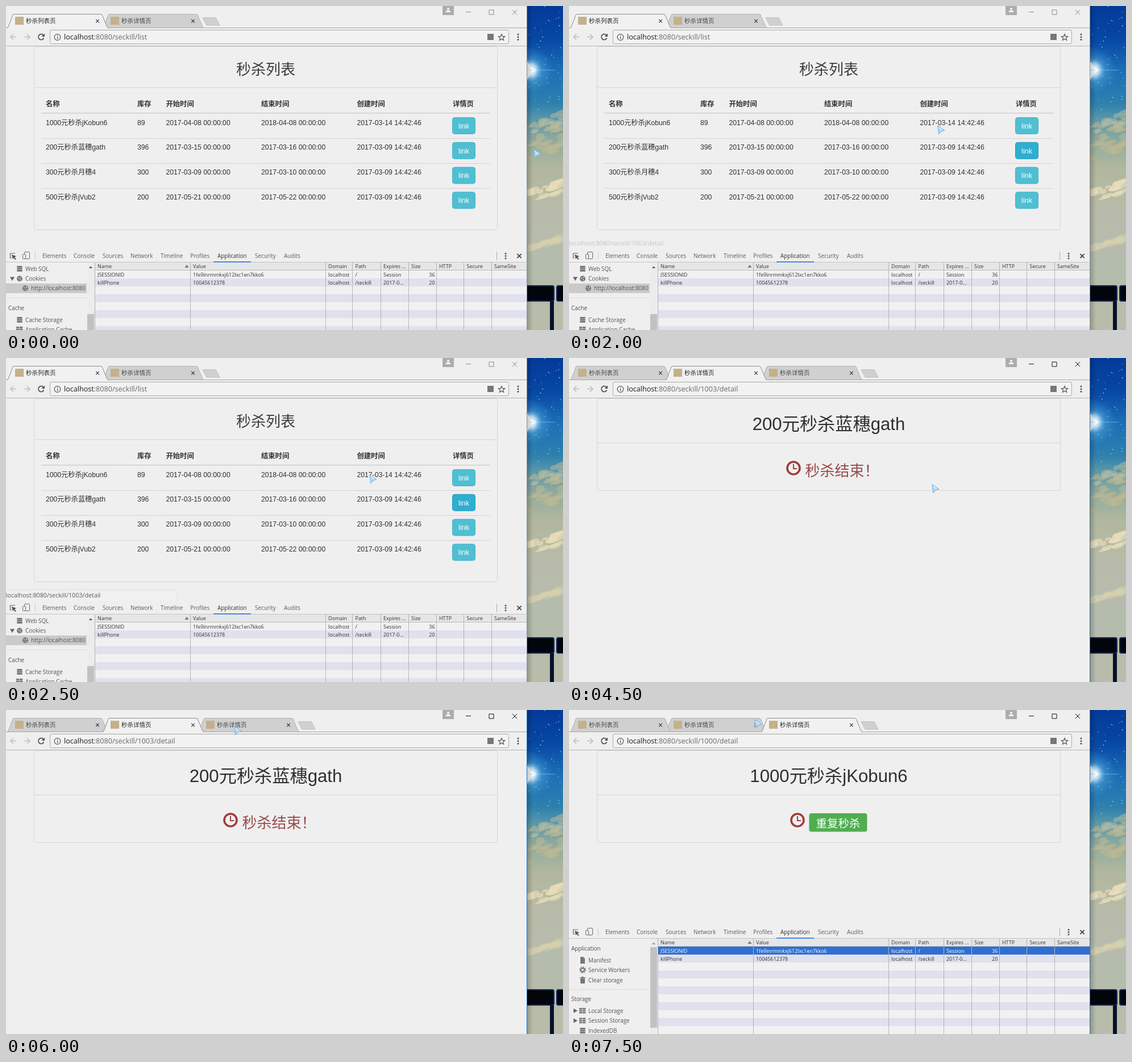
An HTML page with a canvas for the animation above (8000 ms loop, 980x571 px).

```html
<!DOCTYPE html>
<html lang="zh-CN">
<head>
<meta charset="utf-8">
<style>
html, body { margin: 0; width: 100%; height: 100%; overflow: hidden; background: #efefef; }
canvas { display: block; }
</style>
</head>
<body>
<canvas id="stage" width="980" height="571"></canvas>
<script>
const ctx = document.getElementById('stage').getContext('2d');
const UI = '"Open Sans", "Noto Sans CJK SC", "Noto Sans CJK", sans-serif';
const PAGE = '"Liberation Sans", "Noto Sans CJK SC", "Noto Sans CJK", sans-serif';
const BG = '#efefef', INK = '#505050';
const LOOP = 8000;

// [start, view, pointer x, pointer y]
const STEPS = [
  [0, 'list', 929, 253],
  [500, 'hover', 801, 250],
  [2000, 'fade', 649, 211],
  [2500, 'status', 640, 206],
  [3000, 'loading', 641, 205],
  [4500, 'ended', 639, 223],
  [5000, 'ended', 428, 111],
  [6000, 'ended', 402, 29],
  [6500, 'tabHover', 490, 20],
  [7000, 'tabHover', 245, 20],
  [7500, 'repeat', 327, 17]
];
const GOODS = [
  ['1000元秒杀jKobun6', '89', '2017-04-08', '2018-04-08', '2017-03-14'],
  ['200元秒杀蓝穗gath', '396', '2017-03-15', '2017-03-16', '2017-03-09'],
  ['300元秒杀月穗4', '300', '2017-03-09', '2017-03-10', '2017-03-09'],
  ['500元秒杀jVub2', '200', '2017-05-21', '2017-05-22', '2017-03-09']
];

// Drawing helpers; text is centred vertically on y.
function text(str, x, y, size, color = INK, { font = UI, weight = 400, align = 'left' } = {}) {
  ctx.font = `${weight} ${size}px ${font}`;
  ctx.textAlign = align;
  ctx.fillStyle = color;
  ctx.fillText(str, x, Math.round(y + size * 0.37));
}
function rect(x, y, w, h, color) {
  ctx.fillStyle = color;
  ctx.fillRect(x, y, w, h);
}
function paint(fill, stroke, width = 1) {
  if (fill) { ctx.fillStyle = fill; ctx.fill(); }
  if (stroke) { ctx.strokeStyle = stroke; ctx.lineWidth = width; ctx.stroke(); }
}
function box(x, y, w, h, radius, fill, stroke, width) {
  ctx.beginPath();
  ctx.roundRect(x, y, w, h, radius);
  paint(fill, stroke, width);
}
function path(points, fill, stroke, width, open) {
  ctx.beginPath();
  for (let i = 0; i < points.length; i += 2) ctx.lineTo(points[i], points[i + 1]);
  if (!open) ctx.closePath();
  paint(fill, stroke, width);
}
const line = (points, color, width = 1) => path(points, null, color, width, true);
function circle(x, y, r, fill, stroke, width) {
  ctx.beginPath();
  ctx.arc(x, y, r, 0, 7);
  paint(fill, stroke, width);
}
function cross(x, y, r, color, width = 1) {
  line([x - r, y - r, x + r, y + r], color, width);
  line([x + r, y - r, x - r, y + r], color, width);
}
function dots(x, y, gap, color) {
  for (const d of [-gap, 0, gap]) circle(x, y + d, 1.5, color);
}
function gradient(g, ...stops) {
  stops.forEach(([at, color]) => g.addColorStop(at, color));
  return g;
}

function wallpaper() {
  let seed = 7;
  const random = () => (seed = seed * 16807 % 2147483647) / 2147483647;
  // Puffs strewn along a slanted band.
  const cloud = (left, right, spread, color) => {
    for (let i = 0; i < 22; i++) {
      const u = random();
      ctx.beginPath();
      ctx.ellipse(917 + u * 63, left + (right - left) * u + (random() - 0.5) * spread,
        5 + random() * 8, 2 + random() * 4, -0.3, 0, 7);
      paint(color);
    }
  };
  ctx.save();
  ctx.beginPath();
  ctx.rect(916, 0, 64, 571);
  ctx.clip();
  rect(916, 0, 64, 571, gradient(ctx.createLinearGradient(0, 0, 0, 571),
    [0, '#043a98'], [0.1, '#0647a4'], [0.2, '#1b6fb6'], [0.3, '#2d80ad'], [0.35, '#5c98a9'],
    [0.42, '#93ab9e'], [0.5, '#b0b79d'], [0.62, '#b9bba9'], [0.8, '#b4bcae'], [1, '#b9bca9']));
  for (let i = 0; i < 60; i++) circle(917 + random() * 63, random() * 185, 0.3 + random() * 0.8, '#7fbce4');
  circle(922, 113, 42, gradient(ctx.createRadialGradient(922, 113, 3, 922, 113, 42),
    [0, '#ffffff'], [0.2, '#d8f2ffcc'], [0.45, '#63b5e666'], [1, '#3b94d800']));
  path([917, 98, 923, 107, 934, 113, 923, 119, 917, 130], '#f2fbff');
  rect(917, 112.5, 50, 1, '#9fd4f488');
  cloud(222, 196, 20, '#b4b99f88');
  cloud(265, 225, 50, '#bdb99388');
  cloud(338, 316, 22, '#e8dcb8aa');
  cloud(428, 408, 10, '#d9d3b066');
  const beam = '#0b2b5c';
  box(912, 493, 52, 27, 3, '#03050d', beam, 2);
  box(969, 493, 20, 27, 3, '#03050d', beam, 2);
  rect(957, 520, 7, 51, '#08122c');
  rect(917, 0, 10, 571, gradient(ctx.createLinearGradient(917, 0, 927, 0), [0, '#0003'], [1, '#0000']));
  ctx.restore();
}

function tab({ x, width, title, active, hot }) {
  const end = x + width;
  path([x, 38.5, x + 2, 37, x + 10, 15.5, x + 12, 14.5, end - 3, 14.5, end - 1, 15.5, end + 8, 37, end + 10, 38.5],
    active ? '#f1f1f1' : hot ? '#dedede' : '#d0d0d0', active ? '#8c8c8c' : '#b0b0b0', 1);
  if (active) rect(x + 1, 38, width + 8, 1.5, '#f1f1f1');
  if (title) {
    rect(x + 14, 19, 15, 14, '#c4b08a');
    text(title, x + 33, 26, 10.5, active ? '#222' : '#444');
  }
  cross(end - 9, 26.5, 2.8, '#333', 1.1);
}

function browser(view) {
  const listing = ['list', 'hover', 'fade', 'status'].includes(view);
  const loading = view === 'loading';
  const titles = listing ? ['秒杀列表页', '秒杀详情页']
    : ['秒杀列表页', loading ? '' : '秒杀详情页', '秒杀详情页'];
  const current = listing ? 0 : view === 'repeat' ? 2 : 1;
  rect(0, 0, 916, 571, BG);
  rect(916, 0, 1, 571, listing ? '#8797a5' : '#1b7ac8');

  // The untitled tab is still growing into its 52px slot.
  let x = 2;
  const tabs = titles.map((title, i) => {
    const entry = { x, width: title ? 168 : 43, title, active: i === current, hot: view === 'tabHover' && i === 2 };
    x += title ? 168 : 52;
    return entry;
  });
  tabs.filter(t => !t.active).reverse().forEach(tab);
  path([x + 8, 20.5, x + 31, 20.5, x + 38, 34, x + 15, 34], '#d0d0d0', '#bdbdbd');
  line([0, 38.5, 916, 38.5], '#a8a8a8');
  tab(tabs[current]);

  const control = listing ? '#8a8a8a' : '#111';
  rect(768, 0, 20, 16, '#acacac');
  circle(778, 5, 2, '#fff');
  box(774, 8, 8, 3, 1, '#fff');
  line([809, 10.5, 818, 10.5], control);
  box(850, 7, 8, 8, 0, null, control);
  cross(895, 11, 4.2, control);

  line([18, 54.5, 8, 54.5], '#bcbcbc', 1.5);
  line([13, 49.5, 8, 54.5, 13, 59.5], '#bcbcbc', 1.5);
  line([32, 54.5, 42, 54.5], '#bcbcbc', 1.5);
  line([37, 49.5, 42, 54.5, 37, 59.5], '#bcbcbc', 1.5);
  if (loading) cross(62, 54.5, 5, '#505050', 1.8);
  else {
    ctx.beginPath();
    ctx.arc(62, 54.5, 5, 0.4, 5.5);
    paint(null, '#505050', 1.7);
    path([68, 48.5, 68, 54, 62.5, 54], '#505050');
  }
  box(77.5, 42.5, 807, 24, 2, '#f2f2f2', '#aaa');
  circle(90.5, 55, 5.4, null, '#555', 1.2);
  rect(90, 54, 1.3, 4, '#555');
  rect(90, 51.7, 1.3, 1.3, '#555');
  const host = 'localhost';
  text(host, 102, 54.5, 12.6, '#1c1c1c');
  const hostWidth = ctx.measureText(host).width;
  const page = listing ? 'list' : view === 'repeat' ? '1000/detail' : '1003/detail';
  text(':8080/seckill/' + page, 102 + hostWidth, 54.5, 12.6, '#696969');
  if (!loading) rect(847, 49, 11, 11, '#777');
  const star = [];
  for (let i = 0; i < 10; i++) {
    const a = i * Math.PI / 5 - Math.PI / 2, r = i % 2 ? 2.7 : 6;
    star.push(872 + r * Math.cos(a), 55.5 + r * Math.sin(a));
  }
  path(star, null, '#555', 1.2);
  dots(901, 54.7, 4.6, '#505050');
  line([0, 70.5, 916, 70.5], '#b5b5b5');
}

function card(height, divider) {
  box(49.5, 71.5, 815, height, 3, null, '#d6d6d6');
  line([50, divider, 864, divider], '#d3d3d3');
}

function listPage(hovered) {
  const dark = '#303030', font = PAGE;
  card(323, 144);
  text('秒杀列表', 457, 111.5, 26, '#3c3c3c', { font, weight: 300, align: 'center' });
  const columns = [70, 231, 281.5, 449, 617.5, 786];
  ['名称', '库存', '开始时间', '结束时间', '创建时间', '详情页'].forEach((label, i) =>
    text(label, columns[i], 172, 12.3, dark, { font, weight: 600 }));
  line([62, 188.7, 852, 188.7], '#cfcfcf', 1.6);
  GOODS.forEach((row, r) => {
    const y = 205 + r * 43.8;
    row.forEach((cell, c) => {
      const time = c < 2 ? '' : c === 4 ? ' 14:42:46' : ' 00:00:00';
      text(cell + time, columns[c], y, 12.2, dark, { font, weight: 300 });
    });
    const hot = hovered && r === 1;
    box(785.5, y - 8.5, 40, 29, 4, hot ? '#2eaed1' : '#50bfd2', hot ? '#2799b9' : '#43b3ca');
    text('link', 805.5, y + 6.2, 12.5, '#fff', { font, align: 'center' });
    if (r < 3) line([62, Math.round(y + 28) + 0.5, 852, Math.round(y + 28) + 0.5], '#d3d3d3');
  });
}

function statusBubble(faint) {
  if (!faint) box(-3.5, 408.5, 305, 24, 3, '#f0f0f0', '#dedede');
  text('localhost:8080/seckill/1003/detail', -0.5, 418.5, 10.75, faint ? '#c4c4c4' : '#5c5c5c');
}

function clock(x) {
  const red = '#a03c3c';
  circle(x, 194, 11, null, red, 3.6);
  line([x, 187, x, 195, x + 6, 195], red, 2);
}

function detailPage(repeat) {
  const font = PAGE;
  card(162, 149.5);
  text(GOODS[repeat ? 0 : 1][0], 457, 115, 31.2, '#303030', { font, weight: 300, align: 'center' });
  clock(repeat ? 402 : 395);
  if (repeat) {
    box(422.5, 182, 102, 32.5, 4, '#4fae50');
    text('重复秒杀', 473.5, 200, 19.5, '#fff', { font, weight: 500, align: 'center' });
  } else text('秒杀结束！', 415.5, 198, 26, '#974a4c', { font, weight: 300 });
}

const ICONS = {
  database(x, y) {
    for (const d of [-3.5, 0, 3.5]) box(x - 5, y + d - 1.5, 10, 3, 1.5, '#777');
  },
  grid(x, y) {
    for (let i = 0; i < 6; i++) rect(x - 6 + i % 2 * 6, y - 5 + (i >> 1) * 3.5, 5.3, 2.7, '#777');
  },
  cookie(x, y) {
    circle(x, y, 5, '#777');
    for (const [dx, dy] of [[-2, -1], [1, 2], [2, -2]]) circle(x + dx, y + dy, 1, BG);
  },
  file(x, y) { path([x - 4, y - 6, x + 1, y - 6, x + 4, y - 3, x + 4, y + 6, x - 4, y + 6], '#777'); },
  gear(x, y) {
    ctx.setLineDash([2, 1.9]);
    circle(x, y, 5, null, '#777', 2);
    ctx.setLineDash([]);
    circle(x, y, 3, null, '#777', 2);
  },
  trash(x, y) {
    rect(x - 5, y - 5, 10, 1.5, '#777');
    rect(x - 2, y - 6, 4, 1, '#777');
    box(x - 4, y - 3, 8, 9, 1, '#777');
  }
};

function item(icon, label, y, x = 24, arrow) {
  ICONS[icon](x, y);
  text(label, x + 10, y, 9.9, '#555');
  if (arrow === 'open') path([7, y - 3, 15, y - 3, 11, y + 4], '#666');
  if (arrow === 'closed') path([8, y - 4, 15, y, 8, y + 4], '#666');
}

function sidebar(repeat) {
  if (repeat) {
    text('Application', 4, 420, 9.9);
    item('file', 'Manifest', 441);
    item('gear', 'Service Workers', 458);
    item('trash', 'Clear storage', 476);
    line([0, 492.5, 142, 492.5], '#dadada');
    text('Storage', 4, 509, 9.9);
    item('grid', 'Local Storage', 530, 24, 'closed');
    item('grid', 'Session Storage', 547.5, 24, 'closed');
    item('database', 'IndexedDB', 565);
  } else {
    item('database', 'Web SQL', 463);
    item('cookie', 'Cookies', 480.5, 24, 'open');
    rect(0, 489, 142, 17, '#cacaca');
    item('cookie', 'http://localhost:8080', 497.5, 34);
    line([0, 514.5, 142, 514.5], '#dadada');
    text('Cache', 4, 532, 9.9);
    item('database', 'Cache Storage', 553);
    item('grid', 'Application Cache', 570);
  }
}

function devtools(repeat) {
  const top = repeat ? 380 : 429;
  const mid = top + 11;
  rect(0, top, 916, 571 - top, BG);
  line([16, mid - 4, 7.5, mid - 4, 7.5, mid + 4, 10, mid + 4], '#666', 1.2);
  path([10, mid - 2, 18, mid + 1, 15, mid + 3, 18, mid + 6, 16, mid + 7, 13.5, mid + 4, 12, mid + 6], '#555');
  box(32.5, mid - 6.5, 9, 12, 1, null, '#666');
  box(29.5, mid - 2.5, 5, 8, 1, BG, '#666');
  line([51.5, mid - 7, 51.5, mid + 7], '#ccc');
  const panels = { Elements: 64, Console: 119, Sources: 170, Network: 219, Timeline: 272, Profiles: 324,
    Application: 372, Security: 438, Audits: 489 };
  for (const name in panels) text(name, panels[name], mid, 9.9, name === 'Application' ? '#333' : '#5c5c5c');
  line([0, top + 22.5, 916, top + 22.5], '#c4c4c4');
  rect(365, top + 21, 66, 2, '#4787ec');
  line([863.5, mid - 7, 863.5, mid + 7], '#aaa');
  dots(879, mid + 0.5, 4.3, '#555');
  cross(903, mid + 0.5, 3.7, '#444', 1.8);

  sidebar(repeat);
  rect(143, top + 23, 13, 571, '#ececec');
  path([146, top + 33, 152, top + 33, 149, top + 29.5], repeat ? '#999' : '#555');
  if (repeat) rect(143, 418, 12, 142, '#c1c1c1');
  else rect(143, 543, 12, 28, '#c1c1c1');

  const columns = [157, 325, 563, 610.5, 660, 709, 758, 806.5, 855];
  const first = top + 37;
  rect(157, top + 23, 759, 14, '#e6e6e6');
  for (let i = 0, y = first; y < 571; i++, y += 14) {
    rect(157, y, 759, 14, repeat && i === 0 ? '#2f6fd2' : i % 2 ? '#e0e0ef' : '#f1f1f1');
  }
  columns.forEach(x => line([Math.floor(x) - 0.5, top + 23, Math.floor(x) - 0.5, 571], '#b4b4b4'));
  line([157, first - 0.5, 916, first - 0.5], '#b8b8b8');
  path([314.5, top + 32, 321.5, top + 32, 318, top + 27], '#777');
  const rows = [
    ['Name', 'Value', 'Domain', 'Path', 'Expires ...', 'Size', 'HTTP', 'Secure', 'SameSite'],
    ['JSESSIONID', '1fe9inrmmkxj612lxc1en7kko6', 'localhost', '/', 'Session', '36'],
    ['killPhone', '10045612378', 'localhost', '/seckill', '2017-0...', '20']
  ];
  rows.forEach((row, r) => row.forEach((cell, c) => {
    const number = r && c === 5;
    text(cell, number ? 754.5 : columns[c] + 4, top + 30 + r * 14.2, 8.95,
      repeat && r === 1 ? '#fff' : '#333', { align: number ? 'right' : 'left' });
  }));
}

function pointer(x, y) {
  ctx.save();
  ctx.translate(x, y);
  path([0, 0, 11.5, 8, 6, 10, 1.5, 14.5], '#b4d9f5', '#7dbbe6', 1.2);
  line([2, 3, 8, 7.5], '#f4fbff', 1.2);
  ctx.restore();
}

function draw() {
  const t = performance.now() % LOOP;
  const [, view, x, y] = STEPS.findLast(step => step[0] <= t);
  const repeat = view === 'repeat';
  const ended = view === 'ended' || view === 'tabHover';
  wallpaper();
  browser(view);
  if (ended || repeat) detailPage(repeat);
  else if (view !== 'loading') listPage(view !== 'list');
  if (view === 'fade' || view === 'status') statusBubble(view === 'fade');
  if (!ended && view !== 'loading') devtools(repeat);
  pointer(x, y);
  requestAnimationFrame(draw);
}
draw();
</script>
</body>
</html>
```
